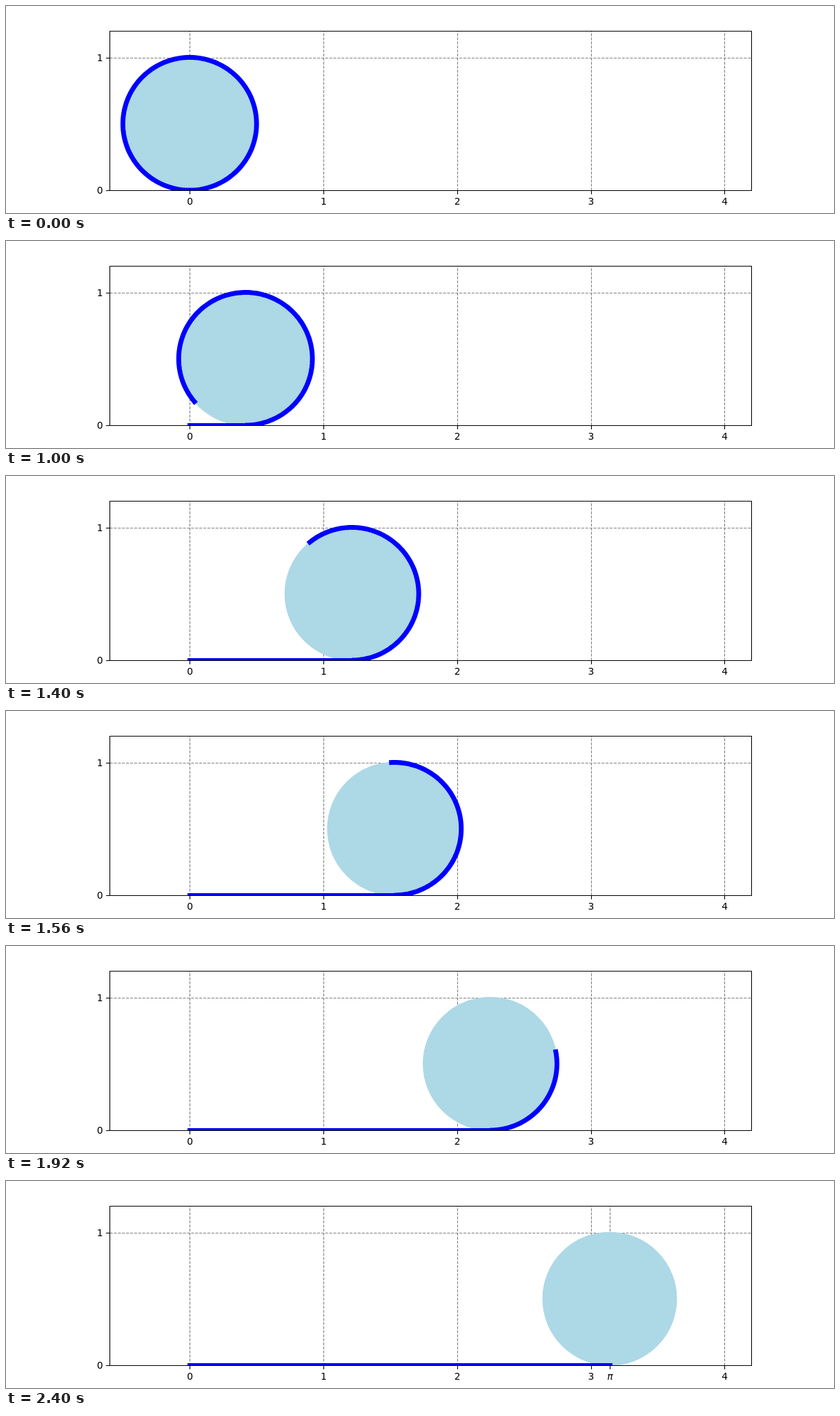
Recreate the animation shown at these times as an HTML page. Size 1200 by 300 pixels, loop 3.2 s.

```html
<!DOCTYPE html>
<html lang="en">
<head>
<meta charset="utf-8">
<title>Unrolling a circle</title>
<style>
  html, body { margin: 0; height: 100%; overflow: hidden; background: #fff; }
  svg { display: block; width: 100vw; height: 100vh; }
  text { font: 13.89px "DejaVu Sans", sans-serif; }
  path, polyline { fill: none; }
  .grid { stroke: #808080; stroke-width: 1.11; stroke-dasharray: 4.11 1.78; }
  .axis { stroke: #000; stroke-width: 1.11; }
  .rim { stroke: #00f; stroke-width: 6.94; }
  .disc { fill: #add8e6; stroke: #add8e6; stroke-width: 1.39; }
</style>
</head>
<body>
<svg viewBox="0 0 1200 300">
  <clipPath id="plot"><rect x="150" y="36" width="931" height="232"/></clipPath>
  <g id="grid"></g>
  <g clip-path="url(#plot)">
    <ellipse id="disc" class="disc" cy="170.75" rx="96.875" ry="96.25"/>
    <polyline id="arc" class="rim"/>
    <path id="trail" class="rim" stroke-linecap="square"/>
  </g>
  <path class="axis" d="M150.5 36.5H1080.5V267.5H150.5Z"/>
  <g id="ticks"></g>
</svg>
<script>
const FRAME_MS = 40, FRAMES = 80, ARC_POINTS = 160;
const $ = id => document.getElementById(id);
const px = x => 266.25 + 193.75 * x;
const py = y => 267 - 192.5 * y;
const snap = v => Math.floor(v + 0.5) + 0.5;

function add(parent, tag, attrs, text = '') {
  const el = document.createElementNS('http://www.w3.org/2000/svg', tag);
  for (const name in attrs) el.setAttribute(name, attrs[name]);
  el.textContent = text;
  return $(parent).appendChild(el);
}

function xTick(value, label, style = 'normal') {
  const x = snap(px(value));
  return [
    add('grid', 'path', { class: 'grid', d: `M${x} 267.5V36.5` }),
    add('ticks', 'path', { class: 'axis', d: `M${x} 267.5V272.9` }),
    add('ticks', 'text', { x: px(value) + 0.5, y: 288, 'text-anchor': 'middle', 'font-style': style }, label)
  ];
}

function yTick(value) {
  const y = snap(py(value));
  add('grid', 'path', { class: 'grid', d: `M150.5 ${y}H1080.5` });
  add('ticks', 'path', { class: 'axis', d: `M150.5 ${y}H145.1` });
  add('ticks', 'text', { x: 140.6, y: Math.floor(y) + 5, 'text-anchor': 'end' }, value);
}

for (let i = 0; i <= 4; i++) xTick(i, i);
yTick(0);
yTick(1);
const piTick = xTick(Math.PI, 'π');
piTick[2].style.fontStyle = 'italic';

// The circle has diameter 1, so the angle left to unroll is 2(π − x).
function arcPoints(x) {
  const left = 2 * (Math.PI - x);
  return Array.from({ length: ARC_POINTS + 1 }, (_, i) => {
    const a = left * i / ARC_POINTS;
    return `${px(x + Math.sin(a) / 2).toFixed(2)},${py(0.5 - Math.cos(a) / 2).toFixed(2)}`;
  }).join(' ');
}

function draw(now) {
  const frame = Math.floor(now / FRAME_MS) % FRAMES;
  const sweep = -Math.PI / 2 + 2 * Math.PI * frame / (FRAMES - 1);
  const x = Math.min(Math.PI, Math.max(0, sweep));
  const done = x === Math.PI;
  $('disc').setAttribute('cx', px(x));
  $('arc').setAttribute('points', done ? '' : arcPoints(x));
  $('trail').setAttribute('d', x > 0 ? `M${snap(px(0))} 267.5H${snap(px(x))}` : '');
  for (const el of piTick) el.style.visibility = done ? 'visible' : 'hidden';
}

const start = performance.now();
function tick() {
  draw(performance.now() - start);
  requestAnimationFrame(tick);
}
tick();
</script>
</body>
</html>
```
